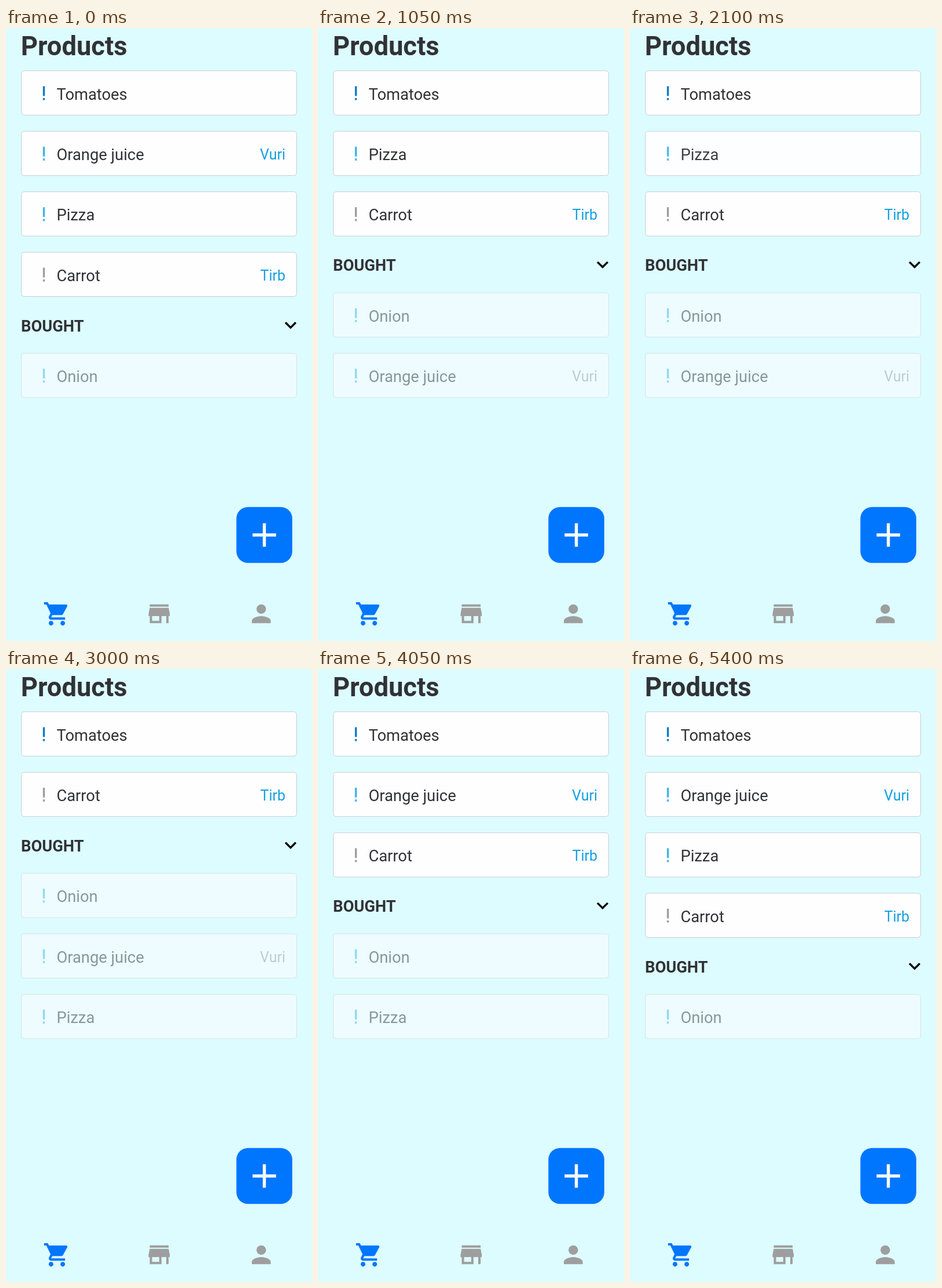
Animation of 529x1058 px, one loop 5950 ms. Source, as an HTML page with a canvas:

```html
<!DOCTYPE html>
<html lang="en">
<head>
<meta charset="utf-8">
<title>Shopping list</title>
<style>
  html, body { margin: 0; width: 100%; height: 100%; overflow: hidden; background: #ddfcff; }
  canvas { display: block; width: 100vw; height: 100vh; }
</style>
</head>
<body>
<canvas id="stage" width="529" height="1058"></canvas>
<script>
const ctx = document.getElementById('stage').getContext('2d');
const LOOP = 5950;
const BG = '#ddfcff', INK = '#303236', BLUE = '#0076ff', LINK = '#12a0e1';
const SKY = '#3db5ea', NAVY = '#0b7cc4', GREY = '#9e9e9e';
const FONT = 'Roboto, sans-serif';
const LIST_TOP = 73.8, PITCH = 104.4, CARD_H = 76.5, HEADER_H = 70;

const items = [
  { name: 'Tomatoes', mark: NAVY },
  { name: 'Onion', mark: SKY, bought: true },
  { name: 'Orange juice', mark: SKY, shop: 'Vuri' },
  { name: 'Pizza', mark: SKY },
  { name: 'Carrot', mark: GREY, shop: 'Tirb' }
];

// touch: finger down, dip: row at its faintest, move: row changes section
const presses = [
  { name: 'Orange juice', touch: 750, dip: 750, move: 1050, x: 74.5, y: 217 },
  { name: 'Pizza', touch: 1750, dip: 1900, move: 2200, x: 55, y: 226 },
  { name: 'Orange juice', touch: 3700, dip: 3750, move: 4050, x: 57, y: 497 },
  { name: 'Pizza', touch: 4850, dip: 4900, move: 5350, x: 57, y: 602 }
];

const icons = {
  cart: new Path2D('M7 18c-1.1 0-1.99.9-1.99 2S5.9 22 7 22s2-.9 2-2-.9-2-2-2zM1 2v2h2l3.6 7.59-1.35 2.45c-.16.28-.25.61-.25.96 0 1.1.9 2 2 2h12v-2H7.42c-.14 0-.25-.11-.25-.25l.03-.12.9-1.63h7.45c.75 0 1.41-.41 1.75-1.03l3.58-6.49c.08-.14.12-.31.12-.48 0-.55-.45-1-1-1H5.21l-.94-2H1zm16 16c-1.1 0-1.99.9-1.99 2s.89 2 1.99 2 2-.9 2-2-.9-2-2-2z'),
  store: new Path2D('M20 4H4v2h16V4zm1 10v-2l-1-5H4l-1 5v2h1v6h10v-6h4v6h2v-6h1zm-9 4H6v-4h6v4z'),
  person: new Path2D('M12 12c2.21 0 4-1.79 4-4s-1.79-4-4-4-4 1.79-4 4 1.79 4 4 4zm0 2c-2.67 0-8 1.34-8 4v2h16v-2c0-2.66-5.33-4-8-4z'),
  chevron: new Path2D('M16.59 8.59L12 13.17 7.41 8.59 6 10l6 6 6-6z')
};

const easeInOut = p => p < 0.5 ? 2 * p * p : 1 - 2 * (1 - p) ** 2;

function text(str, x, y, size, color, weight = 400, align = 'left') {
  ctx.font = `${weight} ${size}px ${FONT}`;
  ctx.fillStyle = color;
  ctx.textAlign = align;
  ctx.fillText(str, x, y);
}

function roundRect(x, y, w, h, r, fill, stroke) {
  ctx.beginPath();
  ctx.roundRect(x, y, w, h, r);
  ctx.fillStyle = fill;
  ctx.fill();
  if (!stroke) return;
  ctx.strokeStyle = stroke;
  ctx.lineWidth = 1;
  ctx.stroke();
}

function icon(path, cx, cy, scale, color) {
  ctx.save();
  ctx.translate(cx, cy);
  ctx.scale(scale, scale);
  ctx.translate(-12, -12);
  ctx.fillStyle = color;
  ctx.fill(path);
  ctx.restore();
}

function drawCard(item, top, bought, opacity) {
  roundRect(26.5, top, 476, CARD_H, 5, '#fffeff', '#c6cdd2');
  ctx.fillStyle = item.mark;
  ctx.fillRect(63.8, top + 26.7, 3.4, 16.8);
  ctx.fillRect(63.8, top + 47, 3.4, 3.6);
  text(item.name, 87.4, top + 49.7, 27.35, INK);
  if (item.shop) text(item.shop, 483, top + 48.6, 25, bought ? GREY : LINK, 400, 'right');

  // veil in the background colour fades the whole row as one layer
  ctx.globalAlpha = 1 - opacity;
  ctx.fillStyle = BG;
  ctx.fillRect(25, top - 2, 479, CARD_H + 4);
  ctx.globalAlpha = 1;
}

function rowOpacity(name, bought, t) {
  const rest = bought ? 0.5 : 1;
  const press = presses.find(p => p.name === name && t >= p.dip && t < p.move);
  if (!press) return rest;
  const p = Math.min(1, (t - press.dip) / 250);
  return 0.2 + (rest - 0.2) * easeInOut(p);
}

function drawList(t) {
  const isBought = item => presses.reduce(
    (state, p) => p.name === item.name && t >= p.move ? !state : state, !!item.bought);
  const drawRows = (rows, top, bought) => rows.forEach((item, i) =>
    drawCard(item, top + i * PITCH, bought, rowOpacity(item.name, bought, t)));

  const open = items.filter(item => !isBought(item));
  const headerTop = LIST_TOP + open.length * PITCH;
  drawRows(open, LIST_TOP, false);
  text('BOUGHT', 26, headerTop + 32.3, 27.3, INK, 700);
  icon(icons.chevron, 492, headerTop + 21.4, 1.68, '#000');
  drawRows(items.filter(isBought), headerTop + HEADER_H, true);
}

function drawTouch(t) {
  const press = presses.find(p => t >= p.touch && t < p.dip + 50);
  if (!press) return;
  ctx.beginPath();
  ctx.arc(press.x, press.y, 12.2, 0, Math.PI * 2);
  ctx.fillStyle = 'rgba(245, 254, 255, 0.85)';
  ctx.fill();
  ctx.strokeStyle = '#b3c5ce';
  ctx.lineWidth = 1.4;
  ctx.stroke();
}

function drawControls() {
  const cx = 446.6, cy = 875, side = 96.6, arm = 20.3, bar = 5.4;
  roundRect(cx - side / 2, cy - side / 2, side, side, 20, BLUE);
  ctx.fillStyle = '#fff';
  ctx.fillRect(cx - arm, cy - bar / 2, arm * 2, bar);
  ctx.fillRect(cx - bar / 2, cy - arm, bar, arm * 2);
  icon(icons.cart, 88, 1011.2, 2.02, BLUE);
  icon(icons.store, 264.8, 1011, 2.04, GREY);
  icon(icons.person, 441.3, 1011, 2.04, GREY);
}

function frame(now) {
  const t = now % LOOP;
  ctx.fillStyle = BG;
  ctx.fillRect(0, 0, 529, 1058);
  text('Products', 25.8, 47.4, 45.3, INK, 700);
  drawList(t);
  drawControls();
  drawTouch(t);
  requestAnimationFrame(frame);
}
requestAnimationFrame(frame);
</script>
</body>
</html>
```
